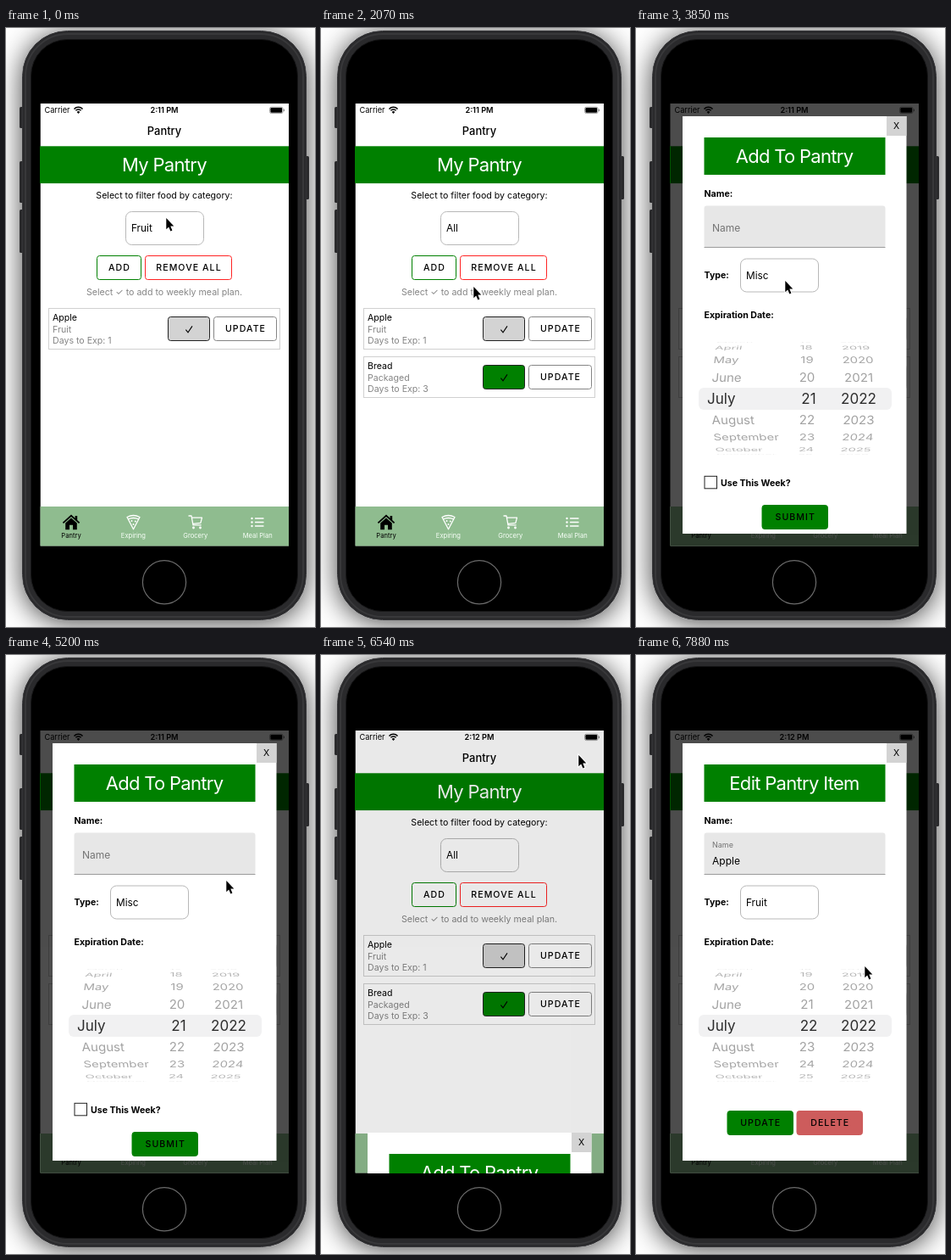
An HTML page for the animation above (8 s loop, 365x706 px).

```html
<!DOCTYPE html>
<html lang="en">
<head>
<meta charset="utf-8">
<title>Pantry</title>
<style>
  html, body { margin: 0; width: 100%; height: 100%; overflow: hidden; background: #fff; }
  #stage { position: relative; width: 365px; height: 706px; overflow: hidden; }
  #shadow { position: absolute; left: 19px; top: 3px; width: 336px; height: 695px; border-radius: 54px;
    box-shadow: 0 3px 32px rgba(0, 0, 0, .74); }
  svg { position: absolute; left: 0; top: 0; display: block; }
  text { font-family: Inter, "Noto Sans", "DejaVu Sans", sans-serif; white-space: pre; }
  .label { font-weight: 500; letter-spacing: 1.05px; }
  .heading { letter-spacing: -.7px; }

  /* Every change is a hard step on one 8 s clock: 1% = 80 ms. */
  .anim { animation: 8s step-end infinite; }
  .hidden { opacity: 0; }
  .cursor { animation-name: cursor; }
  .menu { animation-name: menu; }
  .menu-press { animation-name: menu-press; }
  .before { animation-name: before; }
  .after { animation-name: after; }
  .add-press { animation-name: add-press; }
  .update-press { animation-name: update-press; }
  .clock-old { animation-name: clock-old; }
  .clock-new { animation-name: clock-new; }
  .shade { animation-name: shade; }
  .sheet { transform: translateY(522px); }
  .add-sheet { animation-name: add-sheet; }
  .edit-sheet { animation-name: edit-sheet; }

  @keyframes menu { 3.75% { opacity: 1 } 18.5% { opacity: 0 } }
  @keyframes menu-press { 16.625% { opacity: 1 } 18.5% { opacity: 0 } }
  @keyframes before { 0% { opacity: 1 } 18.5% { opacity: 0 } }
  @keyframes after { 18.5% { opacity: 1 } }
  @keyframes add-press { 35% { opacity: 1 } 36.875% { opacity: 0 } }
  @keyframes update-press { 92.875% { opacity: 1 } 94.75% { opacity: 0 } }
  @keyframes clock-old { 0% { opacity: 1 } 70.5% { opacity: 0 } }
  @keyframes clock-new { 70.5% { opacity: 1 } }
  @keyframes shade {
    36.875% { opacity: .03 } 38.75% { opacity: .49 } 40.625% { opacity: .69 } 42.5% { opacity: .7 }
    79.875% { opacity: .58 } 81.75% { opacity: .085 } 83.625% { opacity: 0 }
    94.75% { opacity: .03 } 96.625% { opacity: .49 } 98.5% { opacity: .7 }
  }
  @keyframes add-sheet {
    36.875% { transform: translateY(500px) } 38.75% { transform: translateY(153.6px) }
    40.625% { transform: translateY(5px) } 42.5% { transform: none }
    79.875% { transform: translateY(90px) } 81.75% { transform: translateY(459px) }
    83.625% { transform: translateY(522px) }
  }
  @keyframes edit-sheet {
    94.75% { transform: translateY(500px) } 96.625% { transform: translateY(153.6px) } 98.5% { transform: none }
  }
  @keyframes cursor {
    0% { transform: translate(189px, 224px) }
    9.25% { transform: translate(190px, 232px) }
    11.125% { transform: translate(191px, 246px) }
    13% { transform: translate(191px, 260px) }
    14.75% { transform: translate(190px, 268px) }
    20.375% { transform: translate(189px, 274px) }
    22.125% { transform: translate(186px, 286px) }
    24% { transform: translate(182px, 298px) }
    25.875% { transform: translate(180px, 305px) }
    29.5% { transform: translate(172px, 302px) }
    31.375% { transform: translate(158px, 294px) }
    33.25% { transform: translate(146px, 288px) }
    35% { transform: translate(142px, 287px) }
    48.125% { transform: translate(176px, 298px) }
    50% { transform: translate(222px, 316px) }
    51.875% { transform: translate(243px, 326px) }
    65% { transform: translate(260px, 266px) }
    66.875% { transform: translate(272px, 222px) }
    68.75% { transform: translate(286px, 172px) }
    70.5% { transform: translate(298px, 136px) }
    72.375% { transform: translate(304px, 120px) }
    74.25% { transform: translate(304px, 118px) }
    83.625% { transform: translate(303px, 126px) }
    85.5% { transform: translate(298px, 190px) }
    87.25% { transform: translate(288px, 270px) }
    89.125% { transform: translate(276px, 340px) }
    91% { transform: translate(270px, 367px) }
  }
</style>
</head>
<body>
<div id="stage"><div id="shadow"></div></div>
<script>
const GREEN = '#008000', GREY = '#858585', SILVER = '#d3d3d3';

const text = (x, y, value, size = 10.6, attrs = '') =>
  `<text x="${x}" y="${y}" font-size="${size}" ${attrs}>${value}</text>`;
const centred = (x, y, value, size, attrs = '') => text(x, y, value, size, `text-anchor="middle" ${attrs}`);
const bold = (x, y, value) => text(x, y, value, 10.6, 'font-weight="700"');
const rect = (x, y, w, h, fill, attrs = '') =>
  `<rect x="${x}" y="${y}" width="${w}" height="${h}" fill="${fill}" ${attrs}/>`;
const group = (cls, body) => `<g class="${cls}">${body}</g>`;
const tick = (x, y) =>
  `<path d="M${x - 3.6} ${y + .6}l2.6 3.2l5-7.4" fill="none" stroke="#000" stroke-width="1.1"/>`;
const screen = (fill, attrs) => rect(40.5, 89, 293.5, 521.6, fill, attrs);

const button = (x, y, w, label, fill, stroke, press = '') =>
  rect(x, y, w, 28, fill, `rx="3" stroke="${stroke}"`) +
  (press && rect(x, y, w, 28, '#d0d0d0', `rx="3" stroke="#aaa" class="anim hidden ${press}"`)) +
  centred(x + w / 2 + .5, y + 17.9, label, 10.6, 'class="label"');

const select = (x, y, value) =>
  rect(x, y, 92, 39, '#fff', 'fill-opacity="0" rx="7" stroke="#b8b8b8"') + value;

function foodRow(y, name, type, days, checkFill, press) {
  return rect(50.5, y, 273, 48, 'none', 'stroke="#d0d0d0"') +
    text(55, y + 14.7, name) +
    text(55, y + 28, type, 10.6, `fill="${GREY}"`) +
    text(55, y + 41.3, `Days to Exp: ${days}`, 10.6, `fill="${GREY}"`) +
    rect(191.5, y + 10, 49, 28, checkFill, 'rx="3" stroke="#222"') +
    tick(216, y + 24.5) +
    button(245.5, y + 10, 74, 'UPDATE', 'none', '#858585', press);
}

function statusBar() {
  const arc = r => `<path d="M${85.5 - r * .72} ${100.5 - r * .72}a${r} ${r} 0 0 1 ${r * 1.44} 0" fill="none" stroke="#000" stroke-width="1.5"/>`;
  const clock = 'font-weight="600"';
  return text(45.5, 100.3, 'Carrier', 9.2) + arc(7) + arc(4.4) +
    '<path d="M85.5 101l-1.9-2a2.6 2.6 0 0 1 3.8 0z"/>' +
    group('anim clock-old', centred(187, 100.3, '2:11 PM', 9.2, clock)) +
    group('anim hidden clock-new', centred(187, 100.3, '2:12 PM', 9.2, clock)) +
    rect(311.5, 93.2, 15.6, 7.4, 'none', 'rx="2" stroke="#888" stroke-width=".8"') +
    rect(312.4, 94.1, 13.8, 5.6, '#000', 'rx="1.2"') + rect(327.9, 95.6, 1.1, 2.6, '#888');
}

function tabBar() {
  const line = d => `<path d="${d}" fill="none" stroke="#fff" stroke-width="1.3" stroke-linejoin="round" stroke-linecap="round"/>`;
  const dot = (x, y, r = 1) => `<circle cx="${x}" cy="${y}" r="${r}" fill="#fff"/>`;
  const list = [578, 582.5, 587].map(y => dot(290.5, y, 1.2) + line(`M294.5 ${y}H304`)).join('');
  const labels = ['Pantry', 'Expiring', 'Grocery', 'Meal Plan'].map((label, i) =>
    centred(77 + i * 73.4, 600.8, label, 7.6, `fill="${i ? '#f8fff8' : '#000'}"`)).join('');
  return rect(40, 564, 294, 47, '#8fbc8f') +
    '<path d="M77 573.5l4.6 4.2v-2.7h2.6v5l3 2.7-1.2 1.3-9-8.1-9 8.1-1.2-1.3z"/>' +
    '<path d="M70.2 583.6l6.8-6.1 6.8 6.1v7.6h-4.8v-5.4h-4v5.4h-4.8z"/>' +
    line('M143 576.5q7.5-4 15 0l-7.5 14.3zM144.3 579q6.2-3 12.4 0') +
    dot(148.5, 581) + dot(152.8, 581.5) + dot(150.5, 585) +
    line('M216 575h3l2 10.8h9.2M219.5 577.2h12l-1.6 6.2-9 .9') + dot(221.5, 589, 1.4) + dot(229.5, 589, 1.4) +
    list + labels;
}

function menu() {
  const labels = ['All', 'Fruit', 'Vegetable', 'Meat', 'Dairy', 'Grain', 'Packaged'];
  return rect(141.5, 255.5, 92, 237, '#fff', 'rx="7" stroke="#b8b8b8"') +
    rect(142, 250, 91, 12, '#fff') +
    '<path d="M141.5 247V264M233.5 247V264M141.5 255.5H233.5" stroke="#b8b8b8"/>' +
    rect(142, 256, 91, 32, '#e4e4e4', 'class="anim hidden menu-press"') +
    labels.map((label, i) => text(148, 276 + i * 33.5, label, 11.8)).join('') + tick(222, 305);
}

function wheel(day) {
  const months = ['March', 'April', 'May', 'June', 'July', 'August', 'September', 'October', 'November'];
  const indent = [84, 89.5, 91.5, 93.5, 95], dayX = [204, 202, 202, 201, 200], yearX = [263, 263, 262, 259.5, 257];
  const tone = ['#2c2c2c', '#a2a2a2', '#a6a6a6', '#b4b4b4', '#ccc'];
  const rows = months.map((month, i) => {
    const k = i - 4, far = Math.abs(k), angle = k * 22 * Math.PI / 180;
    const y = 436.8 + 65.9 * Math.sin(angle), size = far ? 15.3 - far * .2 : 17;
    const cell = (x, value, skew, anchor) =>
      `<g transform="translate(${x} ${y}) skewX(${skew}) scale(1 ${Math.cos(angle)})">` +
      text(0, size * .36, value, size, `fill="${tone[far]}" text-anchor="${anchor}"`) + '</g>';
    return cell(indent[far], month, k * 4, 'start') + cell(dayX[far], day + k, 0, 'middle') +
      cell(yearX[far], 2022 + k, -k * 3, 'middle');
  });
  return rect(74, 424, 228, 26, '#f1f1f2', 'rx="6"') + `<g clip-path="url(#wheel)">${rows.join('')}</g>`;
}

const sheet = (cls, title, field, type, day, footer) => group(`anim sheet ${cls}`,
  rect(55, 104, 264.5, 492, '#fff') +
  rect(296, 104, 23.5, 23, SILVER) + centred(307.5, 119, 'X', 10.6) +
  rect(80.5, 129, 214, 44, GREEN) + centred(187, 159, title, 22, 'fill="#fff" class="heading"') +
  bold(80.5, 198.8, 'Name:') +
  rect(80.5, 209.5, 214, 49.5, '#e7e7e7', 'rx="3"') + rect(80.5, 258, 214, 1, '#9a9a9a') + field +
  bold(80.5, 295, 'Type:') + select(123.5, 272, text(130, 295.8, type, 11.8)) +
  bold(80.5, 341.8, 'Expiration Date:') + wheel(day) + footer);

const page =
  screen('#fff') + statusBar() +
  centred(187, 126.2, 'Pantry', 12.9, 'font-weight="500"') +
  rect(40, 139.3, 294, 43.8, GREEN) + centred(187, 169.4, 'My Pantry', 22, 'fill="#fff" class="heading"') +
  centred(187, 201.2, 'Select to filter food by category:', 10.6) +
  select(141.5, 216.5,
    group('anim before', text(148, 240.4, 'Fruit', 11.8)) +
    group('anim hidden after', text(148, 240.4, 'All', 11.8))) +
  button(107.5, 268.5, 52, 'ADD', 'none', GREEN, 'add-press') +
  button(164.5, 268.5, 102, 'REMOVE ALL', 'none', '#f22') +
  centred(187, 315.2, 'Select ✓ to add to weekly meal plan.', 10.65, `fill="${GREY}"`) +
  foodRow(330.5, 'Apple', 'Fruit', 1, SILVER, 'update-press') +
  group('anim hidden after', foodRow(387.5, 'Bread', 'Packaged', 3, GREEN)) +
  tabBar() + group('anim hidden menu', menu());

const addSheet = sheet('add-sheet', 'Add To Pantry',
  text(90, 240.2, 'Name', 12, 'fill="#737373"'), 'Misc', 21,
  rect(81, 528.3, 14.5, 14.5, '#fff', 'stroke="#222"') + bold(100, 540, 'Use This Week?') +
  button(149, 562.5, 77.5, 'SUBMIT', GREEN, GREEN));

const editSheet = sheet('edit-sheet', 'Edit Pantry Item',
  text(90, 226.8, 'Name', 9, 'fill="#737373"') + text(90, 246.7, 'Apple', 12), 'Fruit', 22,
  button(108, 537.5, 77.5, 'UPDATE', GREEN, GREEN) + button(190, 537.5, 77.5, 'DELETE', '#cd5c5c', '#cd5c5c'));

const sideKeys = [[16, 93, 25], [16, 157, 49], [16, 214, 51], [353, 151, 51]]
  .map(([x, y, h]) => rect(x, y, 5, h, '#2a2a2c', 'rx="1.5"')).join('');
const phone = sideKeys +
  rect(19.5, 3.5, 335, 694, '#2a2a2c', 'rx="53" stroke="#333336"') +
  rect(23, 7, 328, 687, 'none', 'rx="50" stroke="#38383a" stroke-width="2"') +
  rect(29.5, 13.5, 315, 674, '#000', 'rx="43" stroke="#161617"') +
  '<circle cx="187" cy="653.3" r="25.6" fill="none" stroke="#6c6c6c" stroke-width="1.2"/>';

const cursor = group('anim cursor',
  '<path d="M.3 0V13.2L3.2 10.4 5.4 15.4 7.4 14.5 5.3 9.6H9.3Z" stroke="#fff" stroke-width="2" paint-order="stroke"/>');

document.getElementById('stage').insertAdjacentHTML('beforeend',
  `<svg width="365" height="706" viewBox="0 0 365 706">
    <clipPath id="screen">${screen('#000')}</clipPath>
    <clipPath id="wheel">${rect(74, 367, 228, 140, '#000')}</clipPath>
    ${phone}
    <g clip-path="url(#screen)">${page}
      ${screen('#000', 'class="anim hidden shade"')}${addSheet}${editSheet}
    </g>
    ${cursor}
  </svg>`);
</script>
</body>
</html>
```
